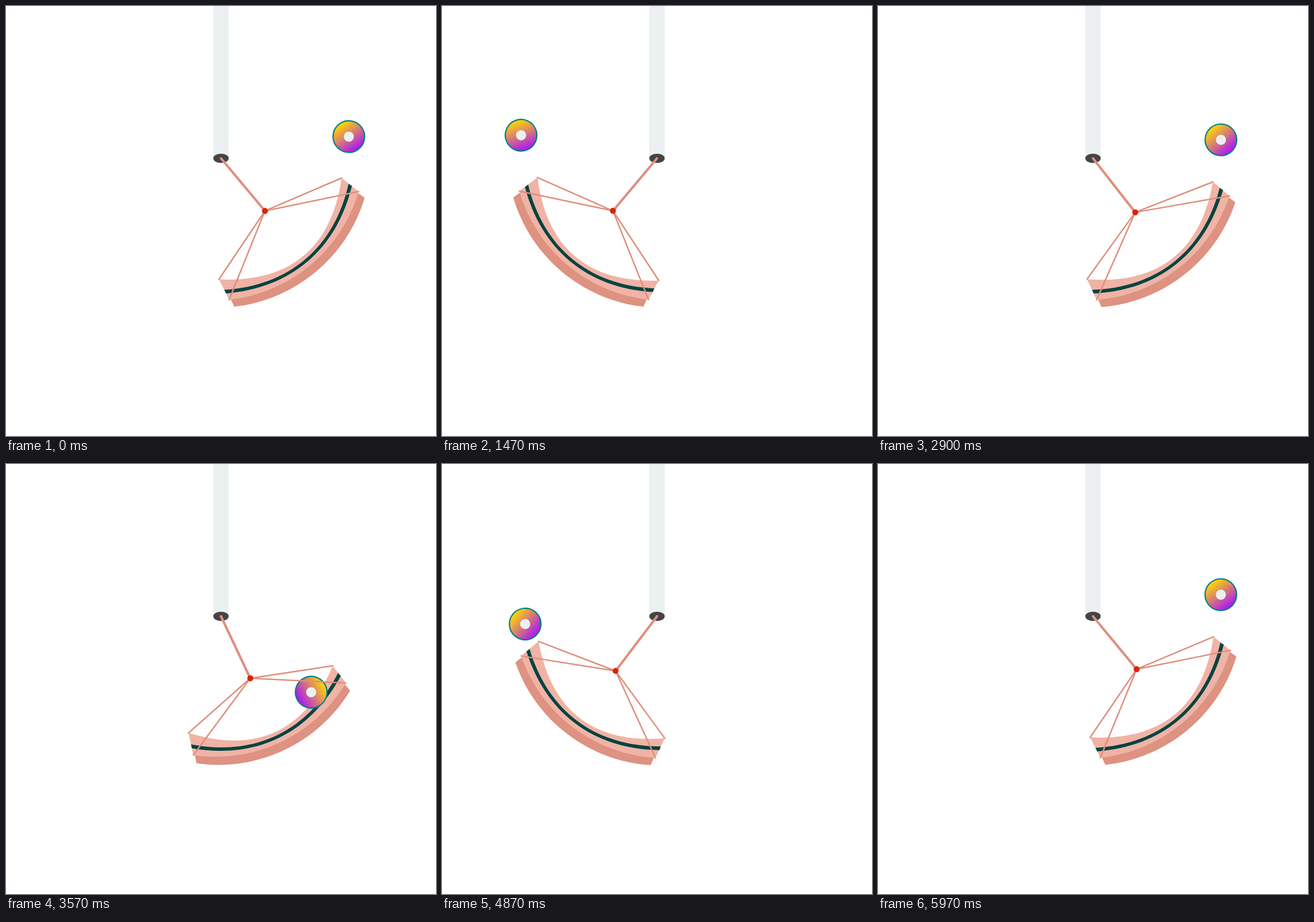
Animation, 748 px wide and 748 px high, one loop 6000 ms. Source, as an HTML page with a canvas:

```html
<!DOCTYPE html>
<html lang="en">
<head>
<meta charset="utf-8">
<title>Swing and ball</title>
<style>
html, body { margin: 0; width: 100%; height: 100%; overflow: hidden; background: #fff; }
canvas { display: block; width: 748px; height: 748px; }
</style>
</head>
<body>
<canvas id="stage" width="748" height="748"></canvas>
<script>
const ctx = document.getElementById('stage').getContext('2d');
const PERIOD = 3000;
const RAD = Math.PI / 180;
const PIVOT = { x: 374, y: 265 };
const ROPE = '#de8f7e', DARK = '#de9281', LIGHT = '#f0b3a6', LINE = '#034440';
const BOB = 119.2;

// Ease along the cubic Bezier (0,0) (x1,0) (x2,1) (1,1).
function ease(u, x1, x2) {
  if (u <= 0) return 0;
  if (u >= 1) return 1;
  let lo = 0, hi = 1;
  for (let i = 0; i < 24; i++) {
    const s = (lo + hi) / 2, w = 1 - s;
    if (3 * w * w * s * x1 + 3 * w * s * s * x2 + s * s * s < u) lo = s;
    else hi = s;
  }
  return lo * lo * (3 - 2 * lo);
}

// Goes from 1 to -1 and back once per period, resting at both ends.
function sway(t, out, back, x1, x2) {
  const since = start => (t - start + 2 * PERIOD) % PERIOD;
  const a = since(out.start), b = since(back.start);
  return a < b
    ? 1 - 2 * ease(a / out.time, x1, x2)
    : 2 * ease(b / back.time, x1, x2) - 1;
}

const swing = t =>
  40.1 * sway(t, { start: 100, time: 1400 }, { start: 1650, time: 1400 }, 0.5, 0.6);

// The ball runs slightly ahead of the swing and leaves the tray at both ends.
function ballPlace(t) {
  const angle = 2.485 * swing(t + 70);
  const flight = Math.max(0, Math.abs(angle) - 55);
  const reach = 205 + flight * (angle < 0 ? 0.78 : 0.46);
  return {
    x: PIVOT.x + reach * Math.sin(angle * RAD),
    y: PIVOT.y + reach * Math.cos(angle * RAD)
  };
}

const ballSpin = t =>
  -315 + 550 * sway(t, { start: 0, time: 1800 }, { start: 1800, time: 1200 }, 0.48, 0.34);

// Curved edge between two points: lowest height and fullness of the curve.
function edge(x0, y0, x1, y1, low, full) {
  const mid = (x0 + x1) / 2, c = full * (x1 - x0) / 2;
  const k = (4 * low - (y0 + y1) / 2) / 3;
  return {
    start: [x0, y0],
    draw() { ctx.bezierCurveTo(mid - c, k, mid + c, k, x1, y1); }
  };
}

function band(top, bottom, color) {
  ctx.beginPath();
  ctx.moveTo(...top.start);
  top.draw();
  ctx.lineTo(...bottom.start);
  bottom.draw();
  ctx.closePath();
  ctx.fillStyle = color;
  ctx.fill();
}

function segment(x0, y0, x1, y1, width) {
  ctx.beginPath();
  ctx.moveTo(x0, y0);
  ctx.lineTo(x1, y1);
  ctx.lineWidth = width;
  ctx.strokeStyle = ROPE;
  ctx.stroke();
}

function disc(x, y, rx, ry, color) {
  ctx.beginPath();
  ctx.ellipse(x, y, rx, ry, 0, 0, Math.PI * 2);
  ctx.fillStyle = color;
  ctx.fill();
}

function inSwing(angle, paint) {
  ctx.save();
  ctx.translate(PIVOT.x, PIVOT.y);
  ctx.rotate(-angle * RAD);
  paint();
  ctx.restore();
}

function tray() {
  band(edge(-142, 190, 142, 190, 236, 0.38),
    edge(147.8, 212.8, -147.8, 212.8, 257.3, 0.4), DARK);
  band(edge(-137.8, 159.2, 139, 160.8, 222.3, 0.34),
    edge(146.8, 197.8, -146.8, 197.8, 242.3, 0.39), LIGHT);
  band(edge(-142.3, 179.2, 142, 176.2, 228.8, 0.36),
    edge(144, 182.8, -144, 185.8, 234.2, 0.36), LINE);
}

function ball(t) {
  const { x, y } = ballPlace(t);
  ctx.save();
  ctx.translate(x, y);
  ctx.rotate(ballSpin(t) * RAD);
  const fill = ctx.createLinearGradient(27, 0, -27, 0);
  fill.addColorStop(0, '#ffd900');
  fill.addColorStop(1, '#aa14f8');
  disc(0, 0, 27.5, 27.5, fill);
  ctx.lineWidth = 2.2;
  ctx.strokeStyle = '#008080';
  ctx.stroke();
  disc(0, 0, 8.8, 8.8, '#ecf0f1');
  ctx.restore();
}

function ropes() {
  ctx.lineCap = 'round';
  segment(0, BOB, -137.8, 159.2, 2.5);
  segment(0, BOB, 139, 160.8, 2.5);
  segment(0, BOB, -146.8, 197.8, 2.5);
  segment(0, BOB, 146.8, 197.8, 2.5);
  segment(0, 0, 0, BOB, 4.2);
  disc(0, BOB, 5.2, 5.2, '#dd2200');
}

function frame(now) {
  const t = now % PERIOD, angle = swing(t);
  ctx.fillStyle = '#fff';
  ctx.fillRect(0, 0, 748, 748);
  ctx.fillStyle = '#ecf0f1';
  ctx.fillRect(360.5, 0, 27, 265);
  disc(374, 265, 13.4, 8, '#444');
  inSwing(angle, tray);
  ball(t);
  inSwing(angle, ropes);
}

let begin = null;
function tick(now) {
  if (begin === null) begin = now;
  frame(Math.max(0, now - begin));
  requestAnimationFrame(tick);
}
frame(0);
requestAnimationFrame(tick);
</script>
</body>
</html>
```
